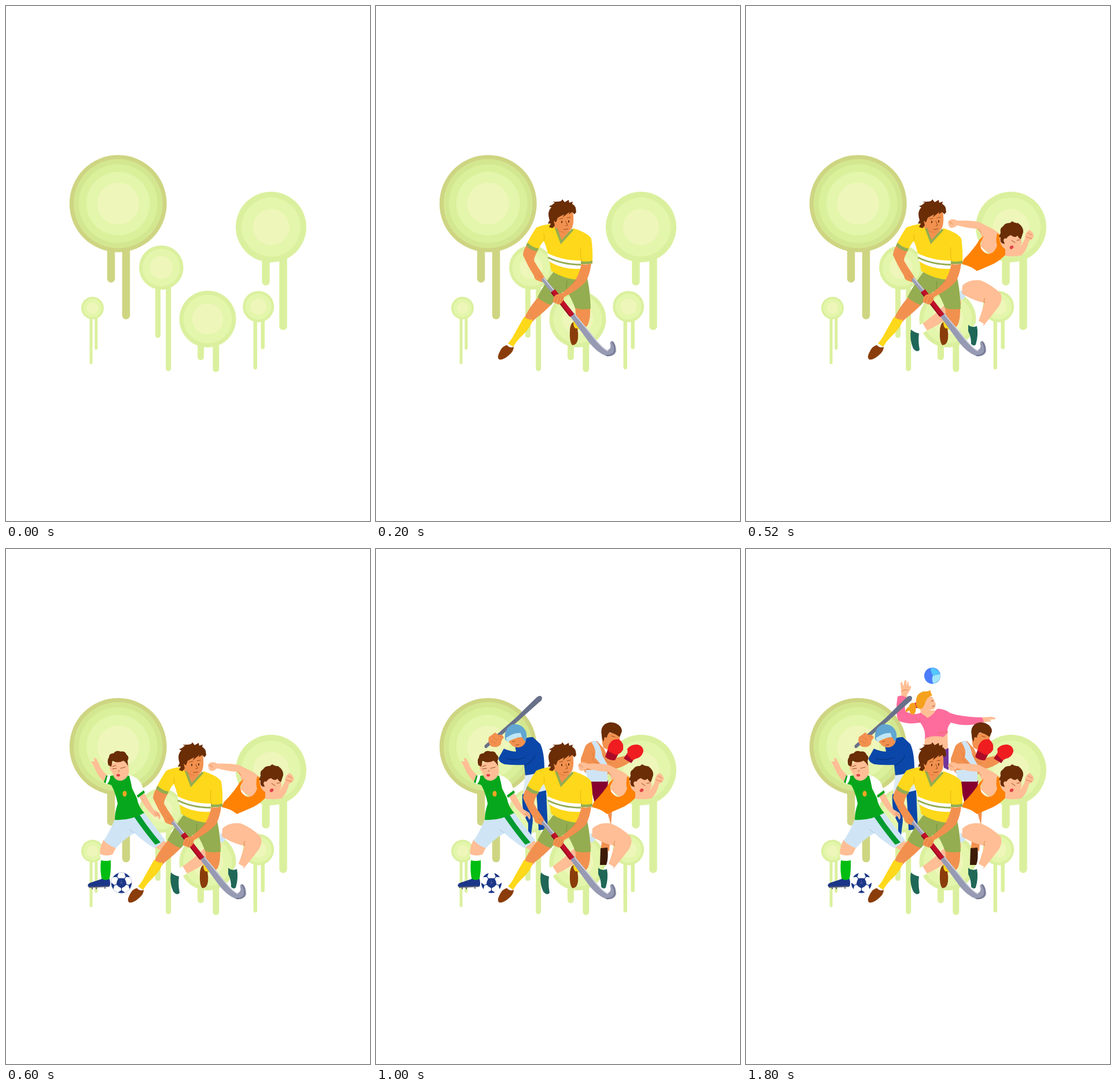
An HTML page for the animation above (2200 ms loop, 629x890 px).

```html
<!DOCTYPE html>
<html lang="en">
<head>
<meta charset="utf-8">
<title>Sports team</title>
<style>
html, body { margin: 0; width: 100%; height: 100%; overflow: hidden; background: #fff; }
svg { display: block; width: 100vw; height: 100vh; }
.tan { fill: #f2914f; } .pale { fill: #ffbe95; } .white { fill: #fff; }
.hair { fill: #6a2d06; } .red { fill: #ef1c20; } .green { fill: #06a71c; } .sock { fill: #00bd12; }
.olive { fill: #94ad50; } .yellow { fill: #fed81a; } .shoe { fill: #8a3d0a; }
.teal { fill: #1f6757; } .navy { fill: #1b3688; } .blue { fill: #0a47a9; }
.ice { fill: #cfe5f5; } .lip { fill: #e0444a; }
.line { fill: none; stroke: #8b4318; stroke-width: .9; stroke-linecap: round; }
.fold { fill: none; stroke: #d9763a; stroke-width: .9; stroke-linecap: round; }
</style>
</head>
<body>
<svg viewBox="0 0 629 890">
  <g id="bubbles"></g>

  <g id="volleyball" data-at="1200">
    <circle cx="322" cy="219" r="14" fill="#4b7dfb"/>
    <path fill="#53c6fc" d="M319 205.3Q331 205 335.5 216L323 219Q319 212 319 205.3Z"/>
    <path fill="#a2e6f8" d="M323 219L335.8 216Q337 228 324 233Q320 226 323 219Z"/>
    <path class="pale" d="M268 244L267 232L269 229L272 237L274 227L277 227L278 236L280 227L282 237L285 237Q286 241 281 247L278 253L279 259L269 258Z"/>
    <path class="pale" d="M408 291L425 290Q433 292 431 294L421 295Q427 299 420 298L410 300Z"/>
    <path class="pale" d="M309 326Q325 317 348 317L349 345L340 352L308 352Z"/>
    <path fill="#71369b" d="M338 349L350 344L350 382L342 378Z"/>
    <path fill="#fd6c9c" d="M262 255Q270 251 279 258Q272 272 276 281Q292 289 303 282L314 291L331 276Q345 277 352 283Q370 290 408 291L411 299Q382 309 354 300Q346 310 349 317L341 325Q322 321 309 328Q311 312 301 300Q280 304 264 297Q257 286 262 255Z"/>
    <path class="pale" d="M303 258Q314 250 323 257L328 268L326 276L317 279L328 279Q323 287 314 292L302 283L300 270Z"/>
    <path fill="#e0413e" d="M291 266L296 264L297 275L292 275Z"/>
    <path fill="#f5a11c" d="M294 264Q293 250 307 246Q313 247 319 244Q318 248 322 253Q311 256 309 268L305 275Q297 279 294 270ZM292 267Q285 263 281 273Q275 276 276 282L283 279Q282 286 290 286Q296 280 292 267Z"/>
    <path class="line" d="M320 263L324 262M322 272L326 271"/>
    <path class="fold" d="M301 299Q297 295 294 294M348 316Q340 318 334 318M269 246Q274 242 280 244"/>
  </g>

  <g id="batter" data-at="1000">
    <path fill="#dceaf3" d="M258 388L291 379L294 422L270 430L254 425Z"/>
    <path class="blue" d="M253 424Q262 420 268 428L271 470L267 502L263 501L263 474Q251 455 253 424ZM277 421L294 417L297 484L281 486Q280 455 277 421Z"/>
    <path fill="#69718a" d="M188 339L240 293L278 256Q285 251 287 257Q287 262 283 264L246 297L191 344Q186 344 188 339Z"/>
    <path class="tan" d="M195 325L206 317L211 321Q219 320 221 326Q216 330 216 337Q210 345 199 341Q192 334 195 325Z"/>
    <path class="fold" d="M201 324L210 331M198 331L207 336M212 322L217 325"/>
    <path class="blue" d="M240 340Q253 325 271 325L284 337Q291 352 291 380Q276 390 258 391L256 373Q238 374 222 372Q211 368 212 361L221 345Q232 350 242 350Z"/>
    <path d="M224 362Q240 367 257 360M257 374Q268 370 275 357" fill="none" stroke="#07347f" stroke-width="1.2"/>
    <path class="tan" d="M228 332L253 323L259 331Q257 341 246 343Q236 343 232 336Z"/>
    <path fill="#60a6d1" d="M223 329Q221 309 236 303Q252 301 259 315Q262 325 258 333L252 325Q238 325 228 333Z"/>
    <path fill="#c0e6f5" d="M224 327Q237 317 250 318L252 325Q238 325 228 334Z"/>
    <path class="line" d="M236 333L240 332M242 339L247 338"/>
  </g>

  <g id="boxer" data-at="800">
    <path class="tan" d="M397 450L408 450L403 522L388 522Z"/>
    <path fill="#3d1b09" d="M388 517L400 516Q402 535 398 546L387 546ZM404 544L410 545L409 553L404 553Z"/>
    <path fill="#87002f" d="M368 398L401 400Q399 420 406 438L378 440Z"/>
    <path class="tan" d="M362 340Q370 331 382 332L394 345L401 360L410 362L432 357L438 369Q425 378 412 380L400 390L366 390Q353 380 354 362Z"/>
    <path class="ice" d="M372 334L379 331Q388 338 391 356L400 373L400 402L367 402L362 382Q380 383 390 374L378 360Q382 346 372 334Z"/>
    <path class="fold" d="M372 350Q379 357 374 364Q386 375 400 379M392 356L398 367L408 370"/>
    <path class="tan" d="M394 318L420 318Q424 335 414 345Q402 350 393 343Q388 330 394 318Z"/>
    <path class="hair" d="M390 322Q387 310 395 303Q404 297 414 301Q425 306 425 315L421 325Q412 318 404 317Q400 319 399 326L395 325L393 333Q390 329 390 322Z"/>
    <path class="line" d="M407 323L413 325"/>
    <path fill="#ab0b27" d="M401 345L419 354L413 365Q403 366 396 359ZM434 353L446 363L441 370L428 362Z"/>
    <path class="red" d="M404 336Q409 327 420 329Q429 335 427 347Q422 355 414 356L401 349Q400 341 404 336ZM434 346Q440 337 452 338Q462 340 462 350Q459 360 450 362L443 365L433 355Q436 351 434 346Z"/>
  </g>

  <g id="runner" data-at="400">
    <path class="pale" d="M370 497L372 515Q350 545 308 563L299 553Q325 535 345 515Z"/>
    <path class="white" d="M305 548L313 561L298 569L293 557Z"/>
    <path class="teal" d="M285 559Q290 564 299 566Q297 578 300 594Q296 600 289 592Q282 576 285 559Z"/>
    <path class="white" d="M373 446Q388 449 400 456L406 477L377 500L366 500Z"/>
    <path class="ice" d="M370 491L383 496L375 507L369 506Z"/>
    <path class="pale" d="M374 483Q385 472 405 474Q424 481 440 497Q444 507 437 519Q424 536 411 552L401 547Q407 530 412 513Q395 510 373 497Z"/>
    <path class="fold" d="M412 513Q410 508 413 505"/>
    <path class="white" d="M400 543L411 549L404 562L391 556Z"/>
    <path class="teal" d="M384 551Q391 557 399 553Q402 568 397 585Q394 589 389 584Q389 571 384 562Z"/>
    <path class="pale" d="M349 374Q352 367 361 369L366 371Q385 370 402 373L428 386L441 396L450 420L425 432L405 415Q411 397 400 385Q382 384 365 379Q355 387 351 381Z"/>
    <path class="pale" d="M446 418L463 423Q475 419 482 402Q482 391 490 387Q498 392 497 399Q494 404 489 406Q485 423 476 431Q460 434 445 431Z"/>
    <path fill="#ff8205" d="M411 397L404 403Q394 420 376 438L373 446Q388 449 399 458Q411 453 429 445Q441 438 448 430L448 420Q437 414 438 395L434 393Q431 407 434 414Q428 430 417 428Q404 423 405 410Z"/>
    <path class="fold" d="M352 373L357 377M401 385L406 391M484 399L494 402M487 392L494 396"/>
    <path class="pale" d="M441 401Q452 394 464 394L475 402Q478 409 474 414Q471 425 461 426Q450 425 443 411Z"/>
    <path class="hair" d="M437 399L440 392Q438 384 444 381Q448 374 456 375L460 372Q465 376 470 375Q480 382 479 391L475 403Q471 401 469 397Q464 402 458 396Q453 397 450 402Q446 400 445 405L447 411Q438 411 440 400Z"/>
    <path class="line" d="M459 405L465 409M468 405L473 404"/>
    <ellipse class="lip" cx="459" cy="417" rx="3.5" ry="2.8" transform="rotate(-35 459 417)"/>
  </g>

  <g id="footballer" data-at="600">
    <path class="pale" d="M257 515L273 503L284 518L270 522Z"/>
    <path class="pale" d="M169 502L190 516Q186 525 181 533L180 541L165 541Q158 521 169 502Z"/>
    <path class="white" d="M162 527Q172 532 184 528L181 541L164 541Z"/>
    <path class="sock" d="M164 538Q172 540 181 538Q182 557 178 574L166 574Q162 556 164 538Z"/>
    <path class="navy" d="M166 570Q172 574 179 570Q181 579 179 583L144 585Q138 581 145 577Z"/>
    <path d="M143 584.5L178 583M149 585v3M156 585v3M171 584v3" stroke="#545b76" stroke-width="1.8"/>
    <path class="ice" d="M188 467Q215 469 239 456L275 503L257 517Q240 508 222 491Q205 500 190 517Q178 513 169 504Q180 487 188 467Z"/>
    <path fill="#009b31" d="M220 461L230 458Q246 483 267 507L258 511Q240 490 220 461Z"/>
    <path d="M222 491Q216 487 213 484" fill="none" stroke="#a8c8e0"/>
    <path class="pale" d="M147 367L153 367L152 361L156 362L161 372Q163 381 175 391L171 403Q160 395 154 380Z"/>
    <path class="pale" d="M230 428L239 422Q247 437 255 450L265 456Q269 464 265 468L261 461L258 464L250 456Q240 447 230 428Z"/>
    <path class="fold" d="M257 457L261 461M260 455L265 462"/>
    <path class="white" d="M172 392L181 390L180 408L169 404ZM211 390Q228 394 234 406L239 419L227 428L217 414Z"/>
    <path class="green" d="M173 391L175.500 392L172 405L169 403ZM238 417L240 421L228 430L226 426Z"/>
    <path class="green" d="M180 392L188 391Q197 403 206 390L213 392Q216 403 218 414L226 430Q229 446 239 456Q214 470 188 468Q188 455 193 440Q189 420 182 408L175 406Q180 400 180 392Z"/>
    <ellipse cx="205" cy="423" rx="3.5" ry="5" fill="#f3a524"/>
    <path class="pale" d="M187 390L207 388Q199 405 187 390Z"/>
    <path class="pale" d="M180 372Q195 364 210 368Q213 380 212 388Q209 397 201 400Q192 402 187 395L183 385Q177 382 180 372Z"/>
    <path class="hair" d="M177 374Q174 365 178 360Q178 353 186 353Q190 347 198 350Q206 349 208 355Q214 360 210 366L211 375Q206 367 203 366Q192 371 184 366L182 376Z"/>
    <path class="line" d="M184 380L191 379M198 379L206 377M184 376L190 374M194 384L196 383"/>
    <ellipse class="lip" cx="194" cy="391" rx="3.2" ry="2.2"/>
    <circle id="ballRim" cx="199.5" cy="577" r="18" fill="#fff" stroke="#a9b3cf" stroke-width=".7"/>
    <g id="football" class="navy" transform="translate(199.5 577)"></g>
  </g>

  <g id="hockey" data-at="200">
    <path class="tan" d="M344 519L370 520Q371 540 366 551Q360 560 351 558Q343 550 346 540Z"/>
    <path class="yellow" d="M341 545Q348 544 351 549L355 557Q347 561 340 558Z"/>
    <path class="shoe" d="M341 546Q335 550 335 562Q334 580 339 586Q347 587 349 575Q350 566 348 557Q341 559 341 546Z"/>
    <path class="tan" d="M283 500L304 515Q288 531 276 540L268 548L256 540Q264 521 283 500Z"/>
    <path class="yellow" d="M256 537Q263 543 271 542Q268 556 250 572Q243 579 237 589L228 583Q234 577 239 567Q249 549 256 537Z"/>
    <path class="shoe" d="M226 586Q232 592 238 589Q238 597 229 604Q220 612 213 611Q208 608 214 597Q218 588 226 586Z"/>
    <path class="olive" d="M307 459L364 466Q370 490 371 523Q357 526 344 522Q338 505 329 492L322 495Q312 506 302 517Q288 512 279 503Q291 480 307 459Z"/>
    <path d="M330 493Q328 484 330 475" fill="none" stroke="#77913c"/>
    <path class="tan" d="M260 414L280 422Q273 434 273 440Q279 451 287 462L293 472Q290 480 281 475Q274 474 273 466Q262 449 254 430Q255 421 260 414Z"/>
    <path class="yellow" d="M299 377Q285 379 277 383Q269 394 260 412Q268 420 280 423Q284 412 290 406Q294 415 297 428L303 458Q325 472 350 473Q357 460 354 443L374 444Q375 420 372 402Q366 392 341 384L320 411L309 378Z"/>
    <path class="olive" d="M262 409Q271 418 281 419L279 424Q267 423 259 414ZM354 441Q365 443 374 440L374 445Q364 447 353 446Z"/>
    <path class="white" d="M296 427Q322 440 354 440L354 454Q322 456 299 441Z"/>
    <path d="M297 434.5Q322 447 354 447" fill="none" stroke="#94ad50" stroke-width="3"/>
    <path d="M290 406Q292 400 290 394M355 441Q352 428 354 417" fill="none" stroke="#e9ba10"/>
    <path class="tan" d="M307 361L340 354Q343 372 339 383Q333 392 328 391L337 388L320 408L310 386L304 377Z"/>
    <path d="M311 384L320 408L340 386" fill="none" stroke="#94ad50" stroke-width="4"/>
    <path class="hair" d="M305 384L299 382L302 376L297 376L300 370Q295 356 303 348L299 346Q305 344 309 340L305 338Q313 339 320 337L322 334L326 339L333 335L334 340L340 338L339 342Q344 345 345 349L346 356L343 360L339 356L333 360L334 356L323 365L325 360L314 366L311 374L307 371L309 379Z"/>
    <path class="line" d="M317 368L323 367M330 366L336 365M328 372L331 379L328 380M324 386Q328 387 332 385"/>
    <path d="M321 372v2.500M333 371v2.500" stroke="#3a1805" stroke-width="1.600" stroke-linecap="round"/>
    <path class="fold" d="M313 386Q318 391 326 391"/>
    <path d="M287 470L342 536" stroke="#9a9db5" stroke-width="7" stroke-linecap="round"/>
    <path fill="#979ab3" d="M343 531Q362 554 377 573Q392 592 400 595Q407 592 405 585Q403 579 409 579Q415 584 415 597Q411 607 398 605Q382 599 368 581Q352 559 336 537Z"/>
    <path d="M288 468L309 493M343 533Q363 556 378 575Q393 593 401 596" fill="none" stroke="#d3d5df" stroke-width="1.8"/>
    <path d="M408 580Q414 588 412 598Q407 605 398 604" fill="none" stroke="#72768f" stroke-width="2"/>
    <path d="M306 492L339 535" stroke="#c10f28" stroke-width="8.5"/>
    <path d="M303 495L335 536" stroke="#8e0a20" stroke-width="2"/>
    <path class="tan" d="M355 446Q364 448 372 445Q370 462 363 476Q350 490 325 503Q323 514 316 516L306 512Q305 503 311 499L322 496Q331 488 341 479Q351 465 355 446Z"/>
    <path class="tan" d="M275 461L286 462L290 469Q287 474 280 474Z"/>
    <path class="fold" d="M313 502L310 510M318 502L315 513M322 502L320 513M280 465L288 471M340 479L346 474"/>
  </g>
</svg>
<script>
const LOOP = 2200;
const RIM_HIDDEN_AT = 1000;
const SVG_NS = "http://www.w3.org/2000/svg";
const byId = id => document.getElementById(id);

function add(parent, tag, attrs) {
  const node = document.createElementNS(SVG_NS, tag);
  for (const key in attrs) node.setAttribute(key, attrs[key]);
  parent.append(node);
}

// rings: [radius, colour]; drips: [centre x, bottom y]
function bubble(x, y, rings, width, drips) {
  const parent = byId("bubbles");
  const [radius, colour] = rings[0];
  for (const [dx, bottom] of drips)
    add(parent, "path", {
      d: `M${dx} ${y + radius * 0.9}V${bottom - width / 2}`,
      stroke: colour, "stroke-width": width, "stroke-linecap": "round"
    });
  for (const [r, fill] of rings) add(parent, "circle", { cx: x, cy: y, r, fill });
}

const OUTER = "#dbf09e", MIDDLE = "#e3f6ab", INNER = "#eef6b9";
const simple = (a, b, c) => [[a, OUTER], [b, MIDDLE], [c, INNER]];

bubble(193.7, 341.5, [[84, "#ced582"], [77, "#d3e790"], [68, "#daf09b"], [55, MIDDLE], [36.5, INNER]],
  13.5, [[181.5, 478], [207.5, 541.5]]);
bubble(458, 382, simple(61, 51, 31.5), 13.5, [[449, 483], [479, 560]]);
bubble(268.3, 452, simple(38.3, 32.5, 20), 9, [[262.5, 573.5], [280.7, 631]]);
bubble(149.5, 522, simple(19.5, 16, 10), 5, [[147, 619], [155.8, 594]]);
bubble(348.5, 541, simple(49, 42, 27), 11, [[336.5, 612], [362.8, 632.5]]);
bubble(436.2, 519.5, simple(27, 22.5, 14), 6.5, [[430.8, 628], [443.7, 593]]);

for (let i = 0; i < 5; i++)
  add(byId("football"), "path", {
    d: "M0 0L-5 -6.5L-.6 -9V-13L-6 -16.5Q0 -18.5 6 -16.5L.6 -13V-9L5 -6.5Z",
    transform: `rotate(${i * 72 + 36})`
  });

const figures = document.querySelectorAll("[data-at]");

function render(time) {
  for (const figure of figures)
    figure.style.display = time >= +figure.dataset.at ? "" : "none";
  byId("ballRim").style.stroke = time >= RIM_HIDDEN_AT ? "none" : "";
}

const start = performance.now();
function tick() {
  render((performance.now() - start) % LOOP);
  requestAnimationFrame(tick);
}
tick();
</script>
</body>
</html>
```
